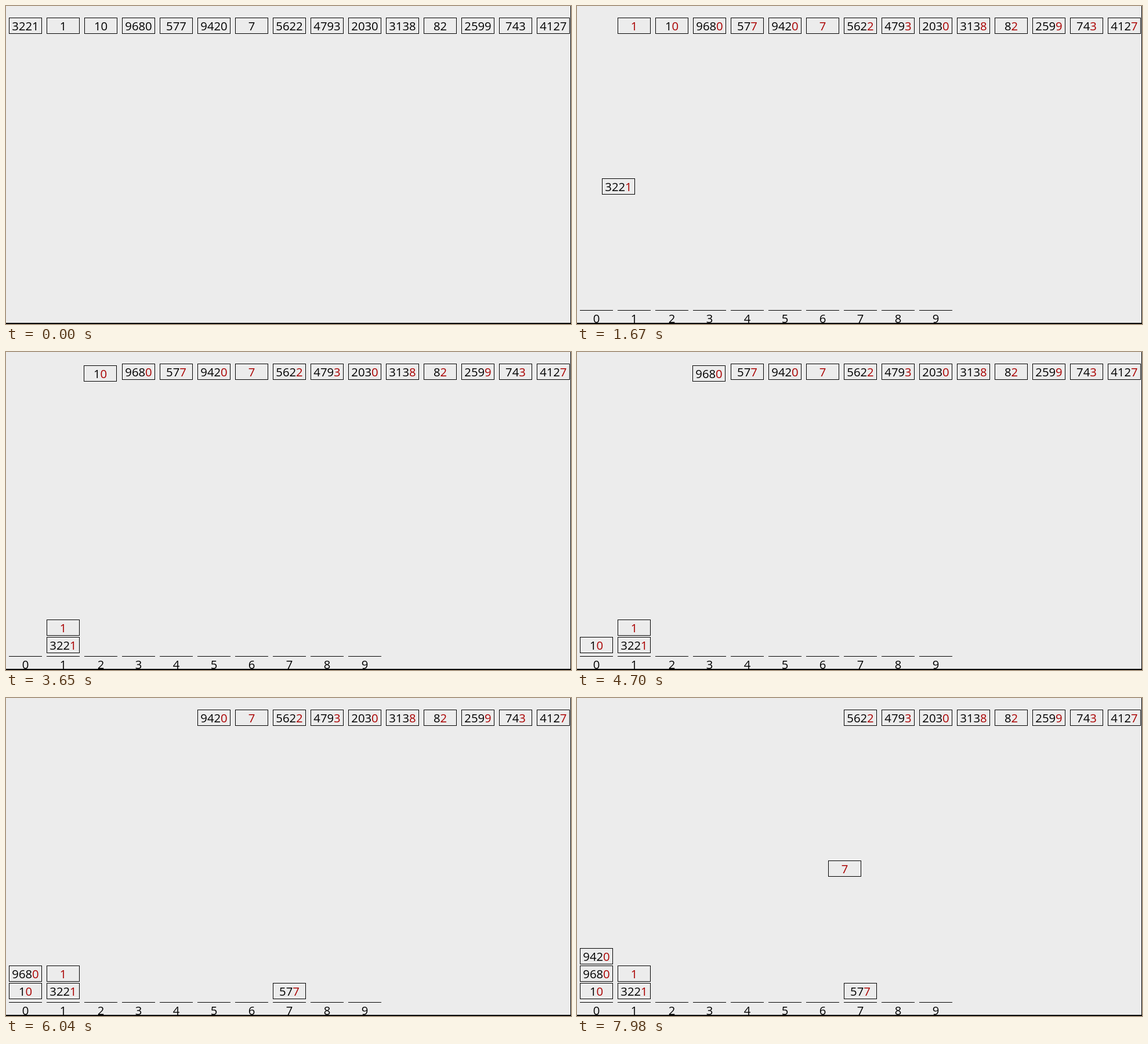
An HTML page with a canvas that plays this animation: 974 by 548 pixels, repeating every 8000 ms.

```html
<!DOCTYPE html>
<html lang="en">
<head>
<meta charset="utf-8">
<title>Radix sort</title>
<style>
html, body { margin: 0; width: 100%; height: 100%; overflow: hidden; background: #ececec; }
canvas { display: block; }
</style>
</head>
<body>
<canvas id="stage" width="974" height="548"></canvas>
<script>
const ctx = document.getElementById('stage').getContext('2d');
const LOOP = 8000, TICK = 40, MOVE = 240;
const FADE_AT = 500, FADE_STEPS = 4;
const PITCH = 65, LEFT = 5, TOP = 20, BOX_W = 57, BOX_H = 28;
const FLOOR = 491, LEVEL = 30;
const PAPER = '#ececec', INK = '#000', RED = 170;
const values = [3221, 1, 10, 9680, 577, 9420, 7, 5622, 4793, 2030, 3138, 82, 2599, 743, 4127];
const starts = [1590, 2600, 3650, 4700, 5800, 6850, 7900];

const column = i => LEFT + i * PITCH;

// Each card drops into the bucket of its last digit, above earlier ones.
const filled = Array(10).fill(0);
const cards = values.map((value, i) => {
  const digit = value % 10;
  const level = i < starts.length ? filled[digit]++ : 0;
  return {
    text: String(value), start: starts[i] ?? Infinity,
    x0: column(i), x1: column(digit), y1: FLOOR - level * LEVEL
  };
});

function progress(elapsed) {
  if (elapsed < 0) return 0;
  const u = Math.min(1, Math.floor(elapsed / TICK) * TICK / MOVE);
  const s = 1 - 0.952 * (1 - u) ** 1.9;
  return s * s * (3 - 2 * s);
}

function drawCard(card, t, fade) {
  const p = progress(t - card.start);
  const x = Math.round(card.x0 + (card.x1 - card.x0) * p);
  const y = Math.round(TOP + (card.y1 - TOP) * p);
  ctx.fillStyle = PAPER;
  ctx.fillRect(x, y, BOX_W, BOX_H);
  ctx.strokeStyle = INK;
  ctx.strokeRect(x + 0.5, y + 0.5, BOX_W - 1, BOX_H - 1);

  const head = card.text.slice(0, -1), tail = card.text.slice(-1);
  const left = x + (BOX_W - ctx.measureText(card.text).width) / 2;
  ctx.fillStyle = INK;
  ctx.fillText(head, left, y + 22);
  ctx.fillStyle = `rgb(${Math.round(RED * fade)},0,0)`;
  ctx.fillText(tail, left + ctx.measureText(head).width, y + 22);
}

function drawBuckets(fade) {
  ctx.globalAlpha = fade;
  ctx.fillStyle = INK;
  for (let d = 0; d < 10; d++) {
    const label = String(d), x = column(d);
    ctx.fillRect(x, 524, BOX_W, 1);
    ctx.fillText(label, x + (BOX_W - ctx.measureText(label).width) / 2, 546);
  }
  ctx.globalAlpha = 1;
}

function draw(t) {
  const step = Math.floor((t - FADE_AT) / TICK) + 1;
  const fade = Math.max(0, Math.min(1, step / FADE_STEPS));
  ctx.fillStyle = PAPER;
  ctx.fillRect(0, 0, 974, 548);
  ctx.font = '20.3px "Open Sans", "Noto Sans", sans-serif';
  ctx.lineWidth = 1;
  drawBuckets(fade);
  ctx.fillStyle = INK;
  ctx.fillRect(973, 0, 1, 548);
  ctx.fillRect(0, 546, 974, 2);
  // Cards still waiting go first so that moving ones stay on top.
  [...cards].reverse().forEach(card => drawCard(card, t, fade));
}

const origin = performance.now();
function frame() {
  draw((performance.now() - origin) % LOOP);
  requestAnimationFrame(frame);
}
frame();
</script>
</body>
</html>
```
